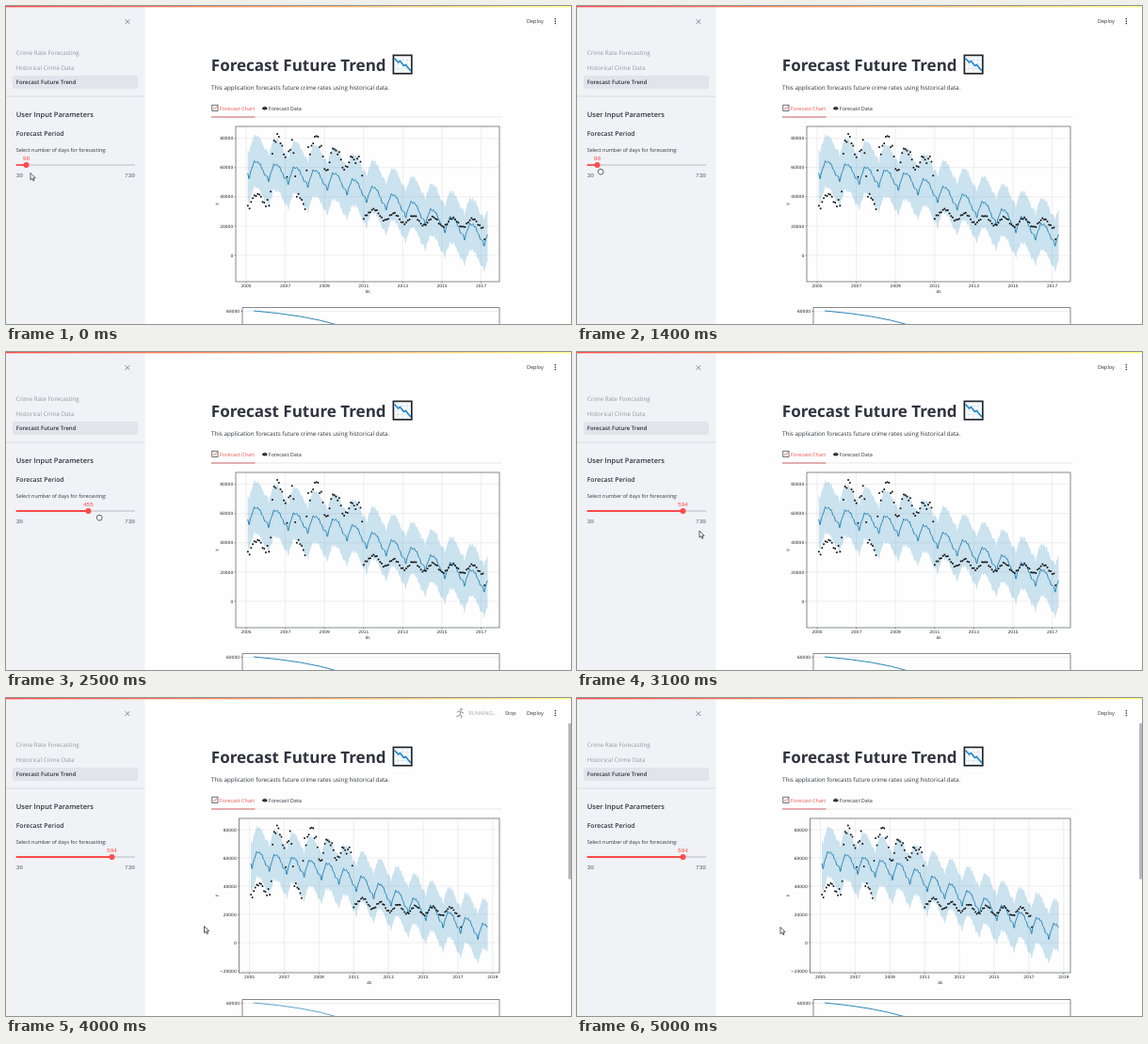
Recreate the animation shown at these times as an HTML page. Size 600 by 338 pixels, loop 5.1 s.

```html
<!DOCTYPE html>
<html lang="en">
<head>
<meta charset="utf-8">
<title>Forecast Future Trend</title>
<style>
html, body { margin: 0; width: 100%; height: 100%; overflow: hidden; background: #fff; }
svg { display: block; width: 600px; height: 338px; }
text { font-family: "Open Sans", "Noto Sans", sans-serif; fill: #31333f; text-rendering: geometricPrecision; }
.nav { font-size: 6.25px; fill: #95989f; }
.small { font-size: 5.5px; }
.mono { font: 6.1px "Liberation Mono", monospace; fill: #5d606a; }
.tick { font: 4.4px "DejaVu Sans", sans-serif; fill: #222; }
.red { fill: #ff4b4b; }
.semi { font-weight: 600; }
</style>
</head>
<body>
<svg id="stage" viewBox="0 0 600 338">
  <defs>
    <linearGradient id="strip">
      <stop offset="0" stop-color="#ff4b4b"/>
      <stop offset="1" stop-color="#fffd80"/>
    </linearGradient>
  </defs>
  <rect width="600" height="338" fill="#fefefe"/>

  <g id="sidebar">
    <rect width="147.5" height="338" fill="#f0f2f6"/>
    <path d="M126.6 14.2l4.8 4.8m0-4.8l-4.8 4.8" stroke="#6f727b" stroke-width=".8"/>
    <rect x="7" y="74" width="133" height="14" rx="2" fill="#e1e4eb"/>
    <text class="nav" x="10.7" y="52">Crime Rate Forecasting</text>
    <text class="nav" x="10.7" y="67.6">Historical Crime Data</text>
    <text class="semi" x="10.7" y="83.4" font-size="6.05">Forecast Future Trend</text>
    <path d="M0 96H147.5" stroke="#d6d9df" stroke-width=".9"/>
    <text class="semi" x="10.7" y="118.2" font-size="7.5">User Input Parameters</text>
    <text class="semi" x="10.7" y="138.2" font-size="6.8">Forecast Period</text>
    <text x="10.7" y="155" font-size="5.45">Select number of days for forecasting:</text>
    <path d="M10.7 169H137" stroke="#d3d6dc" stroke-width="1.8"/>
    <path id="fill" stroke="#ff4b4b" stroke-width="1.8"/>
    <circle id="knob" cy="169" r="3" class="red"/>
    <text id="value" class="mono red" y="164" text-anchor="middle" style="fill:#ff4b4b"></text>
    <text class="mono" x="10.7" y="182">30</text>
    <text class="mono" x="137" y="182" text-anchor="end">730</text>
  </g>

  <g id="header">
    <rect width="600" height="1.3" fill="url(#strip)"/>
    <text class="small" x="553" y="18.2">Deploy</text>
    <g fill="#31333f">
      <circle cx="583.3" cy="13.6" r=".8"/><circle cx="583.3" cy="16.1" r=".8"/><circle cx="583.3" cy="18.6" r=".8"/>
    </g>
    <g id="running">
      <circle cx="483.6" cy="12.2" r="1.1" fill="#8d9099"/>
      <path d="M478.8 15.4l2-1.5 2.2.3-1 3.2 1.9 1.4-.2 2.7M482 17.3l-1.2 1.9-2.6.2M483 14.3l1.2 1.5 2 .1"
        fill="none" stroke="#8d9099" stroke-width="1" stroke-linejoin="round"/>
      <text class="small" x="491.3" y="18.2" style="fill:#a2a5ad">RUNNING...</text>
      <text class="small" x="530" y="18.2">Stop</text>
    </g>
  </g>

  <text x="217.8" y="69.3" font-size="17" font-weight="700">Forecast Future Trend</text>
  <g fill="none">
    <rect x="411.4" y="52.4" width="19.4" height="19.4" fill="#fbfdfe" stroke="#22252c" stroke-width="1.7"/>
    <path d="M416 53.3V71M421 53.3V71M426 53.3V71M412.3 57.5H430M412.3 62H430M412.3 66.5H430" stroke="#cfe0ea" stroke-width=".6"/>
    <path d="M412.5 55.5l4 4.5 2-1.5 4 5 2-1 5.3 6.5" stroke="#1c86c8" stroke-width="1.6"/>
  </g>
  <text x="218" y="89.2" font-size="6.26">This application forecasts future crime rates using historical data.</text>

  <g id="tabs">
    <rect x="218.8" y="105.2" width="6.2" height="6.2" fill="#fff" stroke="#33363d" stroke-width=".7"/>
    <path d="M219.6 110.3l1.7-2 1 .7 2-2.7" fill="none" stroke="#d8504f" stroke-width=".7"/>
    <text class="small red" x="227" y="110.5" style="fill:#ef5350">Forecast Chart</text>
    <ellipse cx="274.8" cy="109" rx="2.9" ry="1.4" fill="#24262c"/>
    <ellipse cx="274.8" cy="107.8" rx="1.6" ry="1.1" fill="#4a4d55"/>
    <text class="small" x="278.8" y="110.5">Forecast Data</text>
    <path d="M218 118H527" stroke="#dfe1e5" stroke-width=".8"/>
    <path d="M218 118H264.5" stroke="#d4666a" stroke-width="1"/>
  </g>

  <g id="charts"></g>

  <rect id="scroll" x="597.2" y="27" width="2.8" height="165.5" fill="#b4b5b8"/>
  <g id="cursor" fill="#fff" stroke="#1b1b1f" stroke-width=".7" stroke-linejoin="round">
    <path id="arrow" d="M0 0V7.2L1.7 5.7 2.9 8.3 4 7.8 2.9 5.3H5.2Z"/>
    <path id="fist" d="M-2.6-.6Q-2.4-2.4-1-2.3 0-3.2 1-2.4 2.9-2.4 2.9-.6V.8Q2.6 2.9 1.2 2.9H-1Q-2.9 1.6-2.6-.6Z"/>
  </g>
</svg>
<script>
const LOOP = 5100, STEP = 100;
const $ = id => document.getElementById(id);

function add(parent, tag, attrs, label) {
  const el = document.createElementNS('http://www.w3.org/2000/svg', tag);
  for (const k in attrs) el.setAttribute(k, attrs[k]);
  if (label !== undefined) el.textContent = label;
  return parent.appendChild(el);
}

// Linear interpolation through rows of [position, value]
function lerp(rows, p, col = 1) {
  if (p <= rows[0][0]) return rows[0][col];
  for (let i = 1; i < rows.length; i++) {
    const a = rows[i - 1], b = rows[i];
    if (p <= b[0]) return a[col] + (b[col] - a[col]) * (p - a[0]) / (b[0] - a[0]);
  }
  return rows[rows.length - 1][col];
}

// Model, in thousands; years count from 2005
const TREND = [[0, 60.7], [4.8, 51], [11, 19], [13.7, 8]];
const SEASON = [[0, -4], [.09, -4.5], [.15, -9], [.21, -4], [.27, -1.5], [.34, 1], [.42, 5], [.5, 3.5],
  [.58, 4.8], [.66, 3], [.72, 3.4], [.8, 0], [.87, -.8], [.95, -4.5], [1, -4]];
const model = y => lerp(TREND, y) + lerp(SEASON, y % 1);

// Monthly observations up to 2010; later ones follow a rule
const EARLY = [
  34, 32, 36.5, 39, 41, 40.5, 42, 41.5, 40, 36.5, 36, 33.5,
  38, 34, 43.5, 69.5, 78.5, 77.5, 83, 81, 76.5, 75, 69, 67,
  53.5, 71, 72, 79, 70, 54, 40, 42, 39, 38, 35, 31.5,
  58, 74, 69, 75, 76.5, 81, 81.5, 81, 74, 75, 67.5, 59,
  58, 58.5, 63.5, 70, 73, 72.5, 71.5, 69, 70.5, 65.5, 60, 58.5,
  61, 60.5, 63.5, 67.5, 67, 65.5, 63, 66, 67.5, 64, 54.5, 25];
function observed(m) {
  if (m < EARLY.length) return EARLY[m];
  if (m === 145) return 11;
  const y = m / 12 + .1;
  return 21.5 + 8 * Math.exp((6.3 - y) / 2) + 3 * Math.sin(2 * Math.PI * (y - .32)) + Math.sin(m * 2.4) * .6;
}

function forecastChart(c) {
  const g = add($('charts'), 'g', {});
  const X = y => c.x0 + y * c.year, Y = v => c.y0 - v * c.unit;
  const at = (y, v) => X(y).toFixed(2) + ' ' + Y(v).toFixed(2);
  const bottom = c.bottom;
  let grid = '', ticks = '';
  for (let y = 0; y <= c.lastTick; y += 2) {
    grid += `M${X(y)} 128V${bottom}`;
    ticks += `M${X(y)} ${bottom}v1.6`;
    add(g, 'text', { class: 'tick', x: X(y), y: bottom + 6.1, 'text-anchor': 'middle' }, 2005 + y);
  }
  for (let v = c.lowTick; v <= 80; v += 20) {
    grid += `M${c.left} ${Y(v)}H524`;
    ticks += `M${c.left} ${Y(v)}h-1.6`;
    add(g, 'text', { class: 'tick', x: c.left - 2.8, y: Y(v) + 1.6, 'text-anchor': 'end' },
      String(v * 1000).replace('-', '\u2212'));
  }
  add(g, 'path', { d: grid, stroke: '#e2e3e5', 'stroke-width': .6 });

  let seed = 7;
  const noise = () => (seed = seed * 16807 % 2147483647) / 2147483647 * 2 - 1;
  const line = [], upper = [], lower = [];
  for (let y = .08; y <= c.end; y += 1 / 36) {
    const v = model(y);
    line.push(at(y, v));
    upper.push(at(y, v + 17.6 + noise() * .9));
    lower.unshift(at(y, v - 17.6 + noise() * .9));
  }
  add(g, 'path', { d: 'M' + upper.concat(lower).join('L') + 'Z', fill: '#0072b2', 'fill-opacity': .2 });
  add(g, 'path', { d: 'M' + line.join('L'), fill: 'none', stroke: '#2a87b5', 'stroke-width': 1, 'stroke-linejoin': 'round' });
  for (let m = 0; m <= 145; m++)
    add(g, 'circle', { cx: X(m / 12 + .09), cy: Y(observed(m)), r: c.dot, fill: '#111' });

  add(g, 'path', { d: ticks, stroke: '#444', 'stroke-width': .5 });
  add(g, 'rect', { x: c.left, y: 128, width: 524 - c.left, height: bottom - 128, fill: 'none', stroke: '#55575c', 'stroke-width': .7 });
  add(g, 'text', { class: 'tick', x: (c.left + 524) / 2, y: bottom + 12.4, 'text-anchor': 'middle' }, 'ds');
  add(g, 'text', { class: 'tick', transform: `translate(225 ${(128 + bottom) / 2}) rotate(-90)`, 'text-anchor': 'middle' }, 'y');
  return g;
}

const shortChart = forecastChart({ x0: 255, year: 20.8, y0: 265, unit: 1.555, left: 244, bottom: 293,
  lastTick: 12, lowTick: 0, end: 12.34, dot: 1 });
const longChart = forecastChart({ x0: 258.5, year: 18.45, y0: 260, unit: 1.5, left: 247.5, bottom: 292,
  lastTick: 14, lowTick: -20, end: 13.73, dot: .95 });

// Top edge of the trend chart below
add($('charts'), 'path', { d: 'M251 324.4H524', stroke: '#e2e3e5', 'stroke-width': .6 });
add($('charts'), 'path', { d: 'M251 340V320.5H524V340M251 324.4h-1.6', fill: 'none', stroke: '#55575c', 'stroke-width': .7 });
add($('charts'), 'text', { class: 'tick', x: 248, y: 326, 'text-anchor': 'end' }, '60000');
const trend = add($('charts'), 'path', { fill: 'none', stroke: '#2a87b5', 'stroke-width': 1 });

const DAYS = [[1400, 90], [1900, 227], [2500, 455], [2900, 594]];
const POINTER = [[0, 26, 177.5], [300, 26, 177], [700, 22, 171], [1000, 22, 171], [1100, 23, 174], [1400, 25, 176],
  [1900, 54, 177], [2500, 99, 176], [2800, 114, 176], [2900, 115, 176], [3100, 130, 190],
  [3500, 183, 232], [3600, 185, 234], [4000, 210.5, 242.5], [4300, 216, 243.5]];

const show = (el, on) => el.setAttribute('visibility', on ? 'visible' : 'hidden');

function draw(t) {
  const days = Math.round(lerp(DAYS, t)), x = 10.7 + (days - 30) * .1805;
  $('fill').setAttribute('d', `M10.7 169H${x}`);
  $('knob').setAttribute('cx', x);
  $('value').setAttribute('x', x);
  $('value').textContent = days;

  const grab = t >= 1000 && t < 2900;
  show($('fist'), grab);
  show($('arrow'), !grab);
  $('cursor').setAttribute('transform', `translate(${lerp(POINTER, t)} ${lerp(POINTER, t, 2)})`);

  show($('running'), t >= 3300 && t < 4500);
  show($('scroll'), t >= 3300);
  show(shortChart, t < 3800);
  show(longChart, t >= 3800);
  trend.setAttribute('d', t < 4300 ? 'M263 324Q318 328.5 352 339' : 'M263 324Q314 328.5 349 339');
  trend.setAttribute('opacity', t >= 3800 && t < 4300 ? .75 : 1);
}

function tick() {
  draw(Math.floor(performance.now() % LOOP / STEP) * STEP);
  requestAnimationFrame(tick);
}
tick();
</script>
</body>
</html>
```
